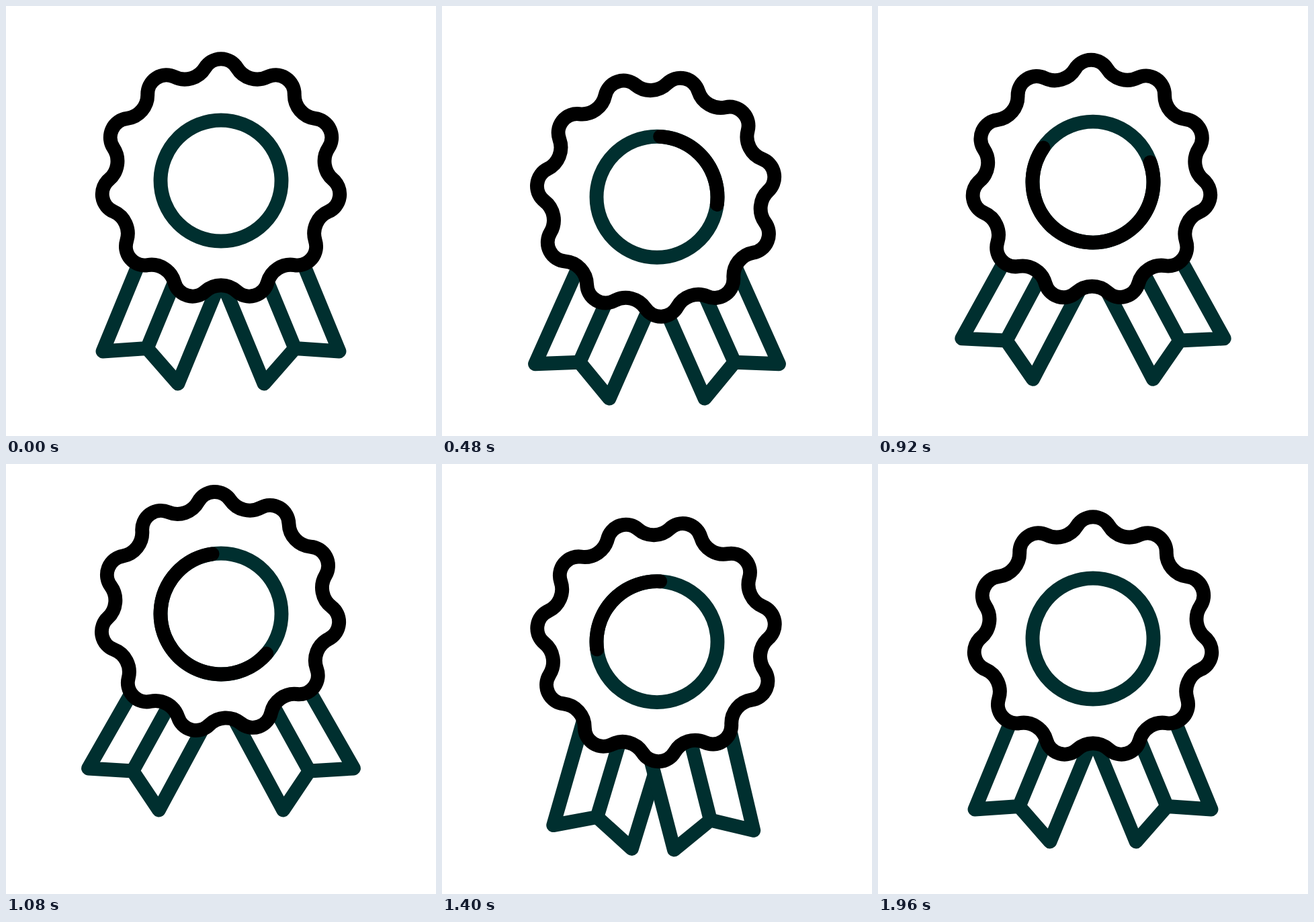
Recreate the animation shown at these times as an HTML page. Size 640 by 640 pixels, loop 2000 ms.

```html
<!DOCTYPE html>
<html lang="en">
<head>
<meta charset="utf-8">
<title>Award rosette</title>
<style>
  html, body { margin: 0; width: 100%; height: 100%; overflow: hidden; background: #fff; }
  svg { display: block; width: 100vw; height: 100vh; }
  .line { fill: none; stroke: #002f2f; stroke-width: 20.9; stroke-linecap: round; stroke-linejoin: round; }
  .filled { fill: #fff; }
  .dark { stroke: #000; }
</style>
</head>
<body>
<svg viewBox="0 0 640 640">
  <g id="medal">
    <path id="left" class="line filled"/>
    <path id="right" class="line filled" transform="scale(-1 1)"/>
    <g transform="translate(0 -1.5) scale(1 1.008)"><path id="badge" class="line filled dark"/></g>
    <circle class="line" r="90"/>
    <circle id="arc" class="line dark" r="90" pathLength="360" transform="rotate(-87)"/>
  </g>
</svg>
<script>
const LOOP = 2000, STEP = 40;

// Each track is a list of [time, value] keys, eased in and out between them.
const tracks = {
  y: [[200, 260], [720, 303.5], [1120, 220.7], [1540, 280], [1880, 260]],
  spin: [[120, 0], [922, 32.5], [1838, 0]],
  left: [[180, 0], [1120, 7.4], [1560, -12.6], [1960, 0]],
  right: [[180, 0], [1120, 7.4], [1600, -19.8], [1920, 0]],
  arcStart: [[564, 0], [1845, 360]],
  arcEnd: [[120, 0], [1194, 360]]
};

function valueAt(keys, t) {
  if (t <= keys[0][0]) return keys[0][1];
  for (let i = 1; i < keys.length; i++) {
    const [t0, v0] = keys[i - 1], [t1, v1] = keys[i];
    if (t < t1) {
      const u = (t - t0) / (t1 - t0);
      return v0 + (v1 - v0) * u * u * (3 - 2 * u);
    }
  }
  return keys[keys.length - 1][1];
}

// Scalloped edge: crest and valley arcs that meet tangentially.
function scallop(count, outer, inner, crest) {
  const half = Math.PI / count, cos = Math.cos(half), c = outer - crest;
  const valley = (crest ** 2 - inner ** 2 - c ** 2 + 2 * c * inner * cos) /
    (2 * (inner - c * cos - crest));
  const s = inner + valley, k = crest / (crest + valley);
  const px = s * Math.sin(half) * k, py = c + (s * cos - c) * k;
  const radius = Math.hypot(px, py), spread = Math.atan2(px, py);
  const point = a => `${(radius * Math.sin(a)).toFixed(2)} ${(-radius * Math.cos(a)).toFixed(2)}`;
  let d = `M${point(-spread)}`;
  for (let i = 0; i < count; i++) {
    const a = 2 * half * i;
    d += `A${crest} ${crest} 0 0 1 ${point(a + spread)}`;
    d += `A${valley} ${valley} 0 0 0 ${point(a + 2 * half - spread)}`;
  }
  return d + "Z";
}

// The top of a ribbon stays pinned behind the badge; its cut end swings.
function ribbon(degrees) {
  const a = degrees * Math.PI / 180, pivot = 75;
  const swing = (x, y) => [
    x * Math.cos(a) - (y - pivot) * Math.sin(a),
    x * Math.sin(a) + (y - pivot) * Math.cos(a) + pivot
  ].map(n => n.toFixed(2)).join(" ");
  const tip = swing(-176, 254), notch = swing(-110, 249.5), end = swing(-64, 302);
  return `M-86 35 L${tip} L${notch} L${end} L46 35 M${notch} L-21.5 35`;
}

const byId = id => document.getElementById(id);
const [medal, left, right, badge, arc] = ["medal", "left", "right", "badge", "arc"].map(byId);

badge.setAttribute("d", scallop(11, 178.3, 156, 28));

function draw(t) {
  const v = name => valueAt(tracks[name], t);
  medal.setAttribute("transform", `translate(320 ${v("y")})`);
  left.setAttribute("d", ribbon(v("left")));
  right.setAttribute("d", ribbon(v("right")));
  badge.setAttribute("transform", `rotate(${v("spin")} 0 -4)`);
  const start = v("arcStart"), length = v("arcEnd") - start;
  arc.style.display = length > 0.01 ? "" : "none";
  arc.setAttribute("stroke-dasharray", `${length} 720`);
  arc.setAttribute("stroke-dashoffset", -start);
}

const begin = performance.now();
function tick() {
  const t = (performance.now() - begin) % LOOP;
  draw(Math.floor(t / STEP) * STEP);
  requestAnimationFrame(tick);
}
tick();
</script>
</body>
</html>
```
